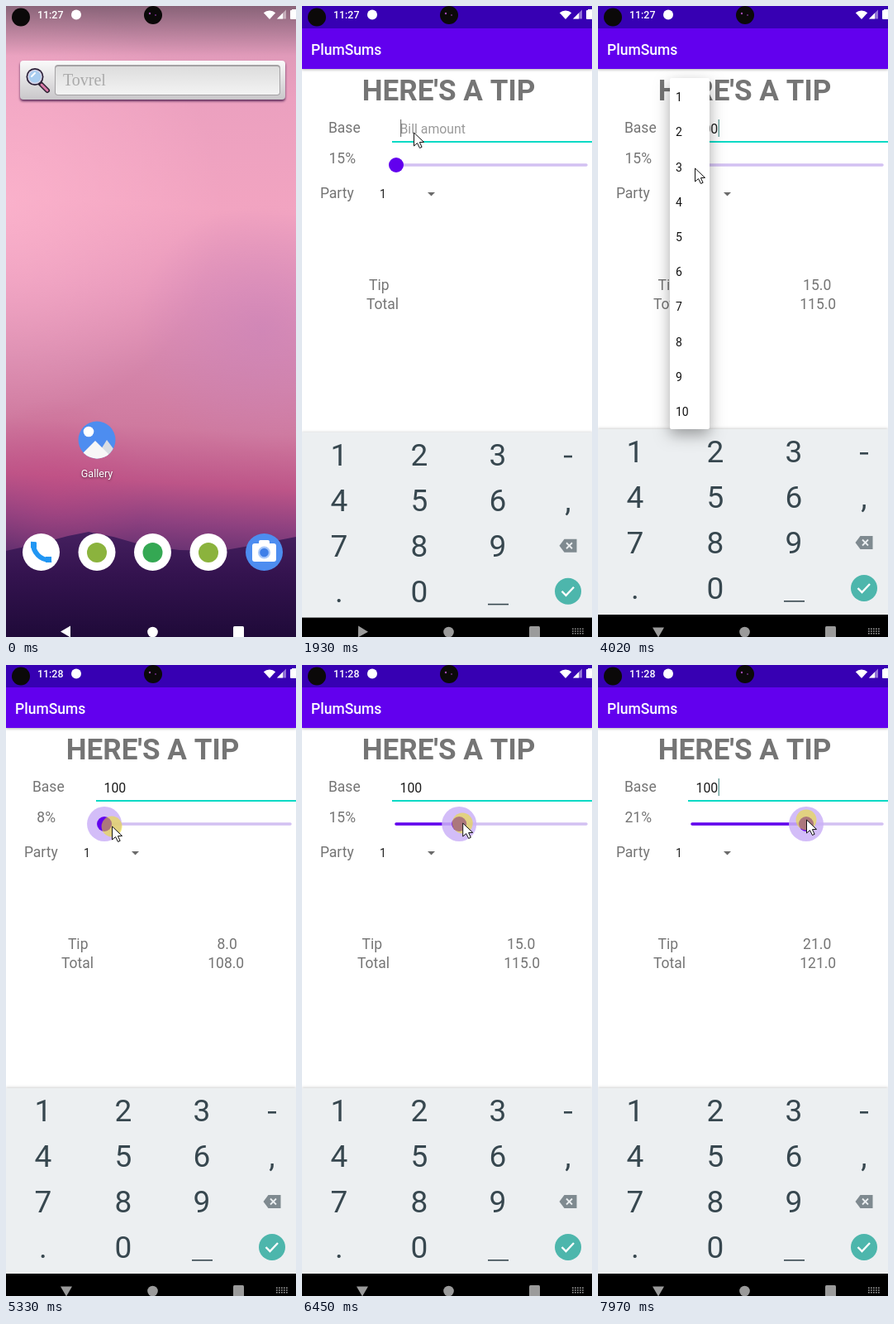
An HTML page with a canvas for the animation above (8 s loop, 351 px wide and 762 px high).

```html
<!DOCTYPE html>
<html lang="en">
<head>
<meta charset="utf-8">
<title>Tip calculator</title>
<style>
html, body { margin: 0; width: 100%; height: 100%; overflow: hidden; background: #000; }
canvas { display: block; }
</style>
</head>
<body>
<canvas id="stage" width="351" height="762"></canvas>
<script>
const W = 351, H = 762, LOOP = 8000;
const c = document.getElementById('stage').getContext('2d');
const PURPLE = '#6200ee', TEAL = '#03dac5', GRAY = '#757575';

const progress = (t, from, to) => Math.min(1, Math.max(0, (t - from) / (to - from)));
const easeOut = p => 1 - (1 - p) ** 3;
const smooth = p => p * p * (3 - 2 * p);

function rect(x, y, w, h, fill, radius = 0) {
  c.fillStyle = fill;
  c.beginPath();
  c.roundRect(x, y, w, h, radius);
  c.fill();
}
function disc(x, y, r, fill) {
  c.fillStyle = fill;
  c.beginPath();
  c.arc(x, y, r, 0, 2 * Math.PI);
  c.fill();
}
function trace(points) {
  c.beginPath();
  for (let i = 0; i < points.length; i += 2) c.lineTo(points[i], points[i + 1]);
}
function poly(fill, ...points) {
  trace(points);
  c.closePath();
  c.fillStyle = fill;
  c.fill();
}
function line(color, width, ...points) {
  trace(points);
  c.strokeStyle = color;
  c.lineWidth = width;
  c.stroke();
}
function text(s, x, y, size, fill = GRAY, align = 'left', weight = 400, family = 'Roboto, sans-serif') {
  c.font = `${weight} ${size}px ${family}`;
  c.textAlign = align;
  c.fillStyle = fill;
  c.fillText(s, x, y);
}
function stops(gradient, list) {
  list.forEach(([at, color]) => gradient.addColorStop(at, color));
  return gradient;
}
function glow(x, y, r, rgb, alpha) {
  c.fillStyle = stops(c.createRadialGradient(x, y, 0, x, y, r),
    [[0, `rgba(${rgb},${alpha})`], [1, `rgba(${rgb},0)`]]);
  c.fillRect(0, 0, W, H);
}
function withShadow(color, blur, dy, draw) {
  c.save();
  c.shadowColor = color;
  c.shadowBlur = blur;
  c.shadowOffsetY = dy;
  draw();
  c.restore();
}

// Pointer keys: time, x, y, slider thumb x
const KEYS = [
  [830, 293, 472, 114], [1480, 135, 153, 114], [3180, 135, 153, 114], [3500, 160, 220, 114],
  [3640, 160, 220, 114], [3950, 117, 196, 114], [4220, 117, 196, 114], [4500, 240, 236, 114],
  [4600, 240, 236, 114], [4980, 123, 195, 114], [5120, 123, 195, 114], [5330, 128, 195, 119],
  [6450, 194, 191, 190], [6730, 255, 189, 252], [7300, 337, 188, 334], [7560, 337, 188, 334],
  [7970, 252, 187, 252]
];
const CLICKS = [[1500, 1660], [3520, 3640], [4520, 4600], [5120, LOOP]];

function pointerAt(t) {
  let i = 0;
  while (i < KEYS.length - 2 && t >= KEYS[i + 1][0]) i++;
  const a = KEYS[i], b = KEYS[i + 1];
  let p = progress(t, a[0], b[0]);
  if (t < 5120) p = smooth(p);
  const [, x, y, thumb] = a.map((v, k) => v + (b[k] - v) * p);
  return { x, y, thumb };
}

function statusBar(t) {
  text(t < 4700 ? '11:27' : '11:28', 38, 15, 12.4, '#fff', 'left', 500);
  disc(85, 10.5, 6, '#fff');
  disc(18, 13.5, 11, '#0b0909');
  disc(178, 11, 11, '#0b0909');
  disc(174, 9, 1.2, '#a04ab0');
  disc(181, 11, 1, '#6b2c80');
  c.fillStyle = '#fff';
  c.beginPath();
  c.moveTo(319, 16);
  c.arc(319, 16, 10.5, -Math.PI * 0.74, -Math.PI * 0.26);
  c.fill();
  poly('rgba(255,255,255,.45)', 328, 15.5, 339, 15.5, 339, 4.5);
  poly('#fff', 328, 15.5, 335, 15.5, 335, 8.5);
  rect(344, 5, 9, 11, '#fff', 1);
  rect(346, 4, 5, 2, '#fff');
}

function navIcons(color, turn = 0, keys = 0) {
  c.save();
  c.translate(73, 755.5);
  c.rotate(turn);
  poly(color, -7, 0, 5, -7, 5, 7);
  c.restore();
  disc(177.5, 756, 6.3, color);
  rect(275, 749, 13, 14, color, 1.5);
  c.globalAlpha *= keys;
  for (let i = 0; i < 15; i++) rect(327 + i % 5 * 3, 751.5 + Math.floor(i / 5) * 2.7, 1.7, 1.5, color);
  c.globalAlpha = 1;
}

function wallpaper() {
  c.fillStyle = stops(c.createLinearGradient(60, 0, 20, 665), [
    [0, '#d795b5'], [.14, '#eba0bf'], [.35, '#f2a4c1'], [.5, '#e595b9'], [.64, '#d586ab'],
    [.75, '#cf7a9f'], [.85, '#bd5588'], [.92, '#8e4180'], [1, '#582c6c']]);
  c.fillRect(0, 0, W, H);
  glow(0, 240, 260, '252,180,205', .8);
  glow(310, 390, 150, '200,130,185', .6);
  glow(60, 585, 110, '200,75,130', .35);
  c.fillStyle = stops(c.createLinearGradient(0, 0, 0, 60), [[0, 'rgba(60,50,60,.5)'], [1, 'rgba(60,50,60,0)']]);
  c.fillRect(0, 0, W, 60);
  poly(stops(c.createLinearGradient(0, 635, 0, H), [[0, '#45205f'], [.4, '#34134f'], [1, '#1f0a39']]),
    0, 658, 45, 648, 75, 640, 100, 635, 130, 641, 165, 651, 210, 657, 260, 658, 300, 651, 351, 641, W, H, 0, H);
}

function home(t) {
  wallpaper();
  statusBar(t);
  withShadow('rgba(65,20,70,.85)', 3, 2, () => rect(17, 66, 321, 47,
    stops(c.createLinearGradient(0, 66, 0, 113), [[0, '#fafafa'], [1, '#c9c7ca']]), 4));
  rect(59, 71, 273, 37, '#a4a2a4', 4);
  rect(60, 73, 271, 34, stops(c.createLinearGradient(0, 72, 0, 107), [[0, '#dcdcdc'], [1, '#f3f3f3']]), 3);
  text('Tovrel', 69, 96, 20, '#aaa', 'left', 400, '"Liberation Serif", serif');
  c.lineCap = 'round';
  line('#2c2030', 6, 42, 94, 50, 102);
  line('#d87aa8', 3, 43, 95, 50, 102);
  disc(35, 85.5, 10.5, '#2c2038');
  disc(35, 85.5, 8.8, '#d6d4e8');
  disc(35, 85.5, 7.2, '#a9cdf0');
  line('#fff', 2, 31, 85, 35, 81);

  disc(110, 524, 22.5, '#4d8df0');
  c.save();
  c.beginPath();
  c.arc(110, 524, 22.5, 0, 2 * Math.PI);
  c.clip();
  poly('#d9dde3', 107, 548, 122, 524, 140, 548);
  poly('#f7f7f7', 85, 548, 108, 525, 131, 548);
  c.restore();
  disc(100, 514, 6.3, '#fff');
  withShadow('rgba(0,0,0,.6)', 3, 1, () => text('Gallery', 110, 569, 12.5, '#fff', 'center'));

  [42.5, 110, 177.5, 245].forEach(x => disc(x, 659.5, 22.5, '#fff'));
  c.strokeStyle = '#2196f3';
  c.lineWidth = 6;
  c.lineCap = 'butt';
  c.beginPath();
  c.moveTo(33, 647);
  c.bezierCurveTo(32, 660, 42, 670, 55, 669);
  c.stroke();
  line('#2196f3', 7, 30, 651, 37, 651);
  line('#2196f3', 7, 51.5, 665, 51.5, 672);
  disc(110, 660, 12, '#8bb33d');
  disc(177.5, 660, 12, '#34a853');
  disc(245, 660, 12, '#8bb33d');
  disc(312.5, 659.5, 22.5, '#4d8df0');
  rect(298, 649, 29, 22, '#fff', 3);
  rect(306, 645, 13, 8, '#fff', 2);
  disc(312.5, 660, 7.5, '#a8c8fa');
  disc(312.5, 660, 5.3, '#3f7fe8');
  navIcons('#fff');
}

function slider(thumb, pressed) {
  c.lineCap = 'round';
  line('#d3c1f2', 3.5, 114, 192, 344, 192);
  if (thumb > 114) line(PURPLE, 3.5, 114, 192, thumb, 192);
  if (pressed) disc(thumb, 192, 21, 'rgba(204,178,247,.85)');
  disc(thumb, 192, 9, PURPLE);
}

function results(base, percent) {
  const show = v => Number.isInteger(v) ? v.toFixed(1) : String(+v.toFixed(2));
  const tip = base * percent / 100;
  [['Tip', tip, 81, 273.7, 343], ['Total', base + tip, 78, 277.2, 366]].forEach(([label, value, left, mid, y]) => {
    const s = base ? show(value) : '';
    c.font = '400 17.5px Roboto, sans-serif';
    const shift = c.measureText(s).width / 4;
    text(label, left - shift, y, 17.5);
    text(s, mid - shift, y, 17.5, GRAY, 'center');
  });
}

function keyboard(shift) {
  const ink = '#37474f';
  c.save();
  c.translate(0, shift);
  withShadow('rgba(0,0,0,.18)', 3, -1, () => rect(0, 511, W, 224, '#eceff1'));
  [45, 142, 237].forEach((x, col) => {
    for (let row = 0; row < 3; row++) text(row * 3 + col + 1, x, 551 + row * 55, 37, ink, 'center');
  });
  text('0', 142, 716, 37, ink, 'center');
  text('.', 45, 716, 37, ink, 'center');
  text(',', 322, 606, 37, ink, 'center');
  rect(317, 539, 10, 2.6, ink);
  rect(225, 718, 25, 1.6, ink);
  poly('#7f8a90', 311.5, 648, 317.5, 640, 332.5, 640, 332.5, 656, 317.5, 656);
  c.lineCap = 'butt';
  line('#eceff1', 1.8, 320, 644.5, 327, 651.5);
  line('#eceff1', 1.8, 327, 644.5, 320, 651.5);
  disc(322, 703, 16, '#4db6ac');
  line('#fff', 2.4, 314.5, 703, 319.5, 708, 329, 698);
  c.restore();
}

function popup(t) {
  const alpha = progress(t, 3640, 3830) * (1 - progress(t, 4570, 4710));
  if (!alpha) return;
  const grow = easeOut(progress(t, 3640, 3860));
  const top = 215 - 128 * grow, height = 42 + 382 * grow;
  c.save();
  c.globalAlpha = alpha;
  withShadow('rgba(0,0,0,.35)', 18, 7, () => rect(87, top, 48, height, '#fff', 2));
  c.beginPath();
  c.rect(87, top, 48, height);
  c.clip();
  for (let i = 1; i <= 10; i++) text(i, 94, 73 + i * 42.2, 14, '#111');
  c.restore();
}

function app(t, { thumb }) {
  const typed = t < 2390 ? '' : t < 2720 ? '1' : t < 2920 ? '10' : '100';
  const percent = t < 5120 ? 15 : Math.round(7.5 + (thumb - 114) / 10.3);
  const focused = t >= 1590;
  rect(0, 0, W, H, '#fff');
  withShadow('rgba(0,0,0,.3)', 3, 1, () => rect(0, 27, W, 49, PURPLE));
  rect(0, 0, W, 27, '#3700b3');
  statusBar(t);
  text('PlumSums', 11, 59, 17.5, '#fff', 'left', 500);
  text("HERE'S A TIP", 177.5, 114, 35.1, GRAY, 'center', 700);

  text('Base', 51.3, 153, 17.5, GRAY, 'center');
  text(typed || 'Bill amount', 118.5, 153.5, 15.8, typed ? '#1c1c1c' : '#9a9a9a');
  const caretX = 119 + c.measureText(typed).width;
  const caretOn = t < 3180 ? t >= 1700 : (t + 280) % 1000 < 500;
  if (caretOn) rect(caretX, 137, 1.2, 21, typed ? '#4c8f8a' : '#777');
  if (focused) rect(109, 163, W - 109, 2, TEAL);
  else rect(109, 163, W - 109, 1, '#828282');

  text(percent + '%', 48.7, 190, 17.5, GRAY, 'center');
  slider(thumb, t >= 5120);
  text('Party', 42.3, 232, 17.5, GRAY, 'center');
  text('1', 94, 232, 14, '#222');
  poly('#6a6a6a', 152, 225, 161, 225, 156.5, 229.5);
  results(+typed, percent);

  rect(0, 735, W, 27, '#000');
  const slide = easeOut(progress(t, 1720, 2000));
  if (slide) keyboard(251 * (1 - slide));
  if (slide && slide < 1) rect(0, 735 + 251 * (1 - slide), W, 60, '#000');
  if (slide < .9) rect(0, 735, W, 27, '#000');
  navIcons('#9b9b9b', progress(t, 1790, 2000) * Math.PI * 1.5, progress(t, 1790, 1950));
  popup(t);
}

function mouse(t, { x, y }) {
  if (t < 830) return;
  if (CLICKS.some(([from, to]) => t >= from && t < to)) disc(x, y, 12.5, 'rgba(240,228,20,.52)');
  c.save();
  c.translate(x + .5, y);
  c.lineJoin = 'round';
  poly('#fff', 0, 0, 0, 16, 4, 12.6, 7, 18.5, 9.6, 17.3, 6.9, 11.6, 12, 11.4);
  c.closePath();
  c.strokeStyle = '#111';
  c.lineWidth = 1;
  c.stroke();
  c.restore();
}

function frame(now) {
  const t = now % LOOP, pointer = pointerAt(t);
  const open = easeOut(progress(t, 70, 350));
  c.globalAlpha = 1;
  if (open < 1) home(t);
  if (open) {
    c.save();
    if (open < 1) {
      c.translate(0, 70 * (1 - open));
      c.beginPath();
      c.rect(0, H * .45 * (1 - open), W, H);
      c.clip();
    }
    app(t, pointer);
    c.restore();
  }
  mouse(t, pointer);
}

const start = performance.now();
(function loop() {
  frame(performance.now() - start);
  requestAnimationFrame(loop);
})();
</script>
</body>
</html>
```
